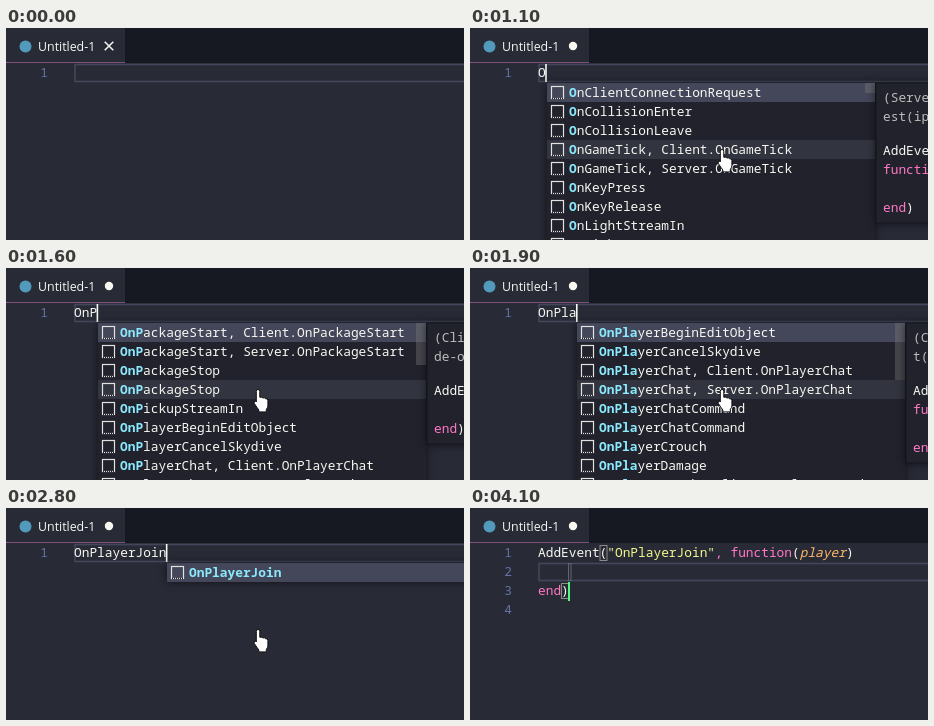
Animation of 458x212 px, one loop 4200 ms. Source, as an HTML page:

```html
<!DOCTYPE html>
<html lang="en">
<head>
<meta charset="utf-8">
<title>Editor autocomplete</title>
<style>
  html, body { margin: 0; width: 100%; height: 100%; overflow: hidden; background: #282a36; }
  svg { display: block; width: 458px; height: 212px; }
  text { font: 500 12.83px "Noto Sans Mono", "DejaVu Sans Mono", monospace; fill: #f8f8f2; white-space: pre; }
  .tab { font: 12.4px "Open Sans", "Noto Sans", sans-serif; }
  .num { fill: #6272a4; font-weight: 400; }
  .pink { fill: #ff79c6; }
  .str { fill: #f1fa8c; }
  .arg { fill: #ffb86c; font-style: italic; }
  .hit { fill: #8be9fd; font-weight: 700; }
  .dim { fill: #bdbdbb; font-weight: 400; }
  .panel { filter: drop-shadow(0 0 4px #0009); }
</style>
</head>
<body>
<svg id="stage" viewBox="0 0 458 212"></svg>
<script>
const LOOP = 4200, LEFT = 68, CHAR = 7.697, ROW = 19;
const WORD = 'OnPlayerJoin';
// Time at which each letter of WORD appears
const KEYS = [800, 1400, 1600, 1700, 1900, 2000, 2100, 2200, 2400, 2500, 2600, 2800];
const ACCEPT = 3000;

const both = name => ['Client', 'Server'].map(side => `${name}, ${side}.${name}`);
const PLAYER = ['OnPlayerBeginEditObject', 'OnPlayerCancelSkydive', ...both('OnPlayerChat'),
  'OnPlayerChatCommand', 'OnPlayerChatCommand', 'OnPlayerCrouch', 'OnPlayerDamage', ...both('OnPlayerDeath')];
const LISTS = [
  { from: 1, thumb: 10, docs: ['(Server) OnClientConnectionRequ', 'est(ip, port)', 'AddEvent', 'function', '', 'end)'],
    items: ['OnClientConnectionRequest', 'OnCollisionEnter', 'OnCollisionLeave', ...both('OnGameTick'),
      'OnKeyPress', 'OnKeyRelease', 'OnLightStreamIn', 'OnLightStreamOut'] },
  { from: 3, thumb: 42, docs: ['(Client)', 'de-on', 'AddEvent', '', 'end)'],
    items: [...both('OnPackageStart'), 'OnPackageStop', 'OnPackageStop', 'OnPickupStreamIn', ...PLAYER] },
  { from: 4, thumb: 57, docs: ['(Client)', 't(object)', 'AddEvent', 'function', '', 'end)'], items: PLAYER },
  { from: 9, thumb: 0, docs: [], items: ['OnPlayerJoin'] }
];

const rect = (x, y, w, h, fill, more = '') =>
  `<rect x="${x}" y="${y}" width="${w}" height="${h}" fill="${fill}" ${more}/>`;
const frame = (x, y, w, h, color, width = 1) =>
  rect(x, y, w, h, 'none', `stroke="${color}" stroke-width="${width}"`);
const text = (x, y, s, cls = '') => `<text x="${x}" y="${y}" class="${cls}">${s}</text>`;
const span = (cls, s) => `<tspan class="${cls}">${s}</tspan>`;
const path = (d, more) => `<path d="${d}" ${more}/>`;
const baseline = line => 30 + ROW * line;

function tab(dirty) {
  const mark = dirty
    ? '<circle cx="103" cy="18" r="4.2" fill="#f8f8f2"/>'
    : path('M98.7 13.7l8.6 8.6m0-8.6l-8.6 8.6', 'stroke="#f8f8f2" stroke-width="1.5"');
  return rect(0, 0, 458, 35, '#171922') + rect(0, 0, 119, 35, '#282a36') + rect(0, 34, 119, 1, '#80507a') +
    '<circle cx="19.5" cy="18.5" r="6" fill="#519aba"/>' + text(32, 22.5, 'Untitled-1', 'tab') + mark;
}

const lineBox = line => frame(69, 17.5 + ROW * line, 400, 17, '#44475a', 1.6);
const lineNumber = line => text(34.3, baseline(line), line, 'num');

function popup(typed, withDocs) {
  const list = LISTS.filter(l => l.from <= typed).pop();
  const x = Math.floor(69.5 + 7.69 * typed), top = 55, width = 328;
  const height = list.items.length * ROW;
  let out = rect(x, top, width, height, '#21222c', 'class="panel"') + rect(x, top, width, ROW, '#44475a');
  if (list.items.length > 3) out += rect(x, top + 3 * ROW, width, ROW, '#323440');
  list.items.forEach((item, i) => {
    const y = top + i * ROW;
    out += rect(x + 4.5, y + 3.5, 12, 12, 'none', 'stroke="#e2e2de" stroke-width="1.2"') +
      path(`M${x + 5} ${y + 15.5}h12`, 'stroke="#21222c" stroke-width="1.6" stroke-dasharray="1 1"') +
      text(x + 22, y + 14, span('hit', item.slice(0, typed)) + item.slice(typed));
  });
  out += rect(x + width - 10, top, 10, list.thumb, '#79797966');
  if (withDocs && list.docs.length) {
    const dx = x + width + 1, last = list.docs.length - 1;
    out += rect(dx, top, 200, 26 + ROW * list.docs.length, '#21222c', 'stroke="#15161d" class="panel"');
    list.docs.forEach((s, i) => {
      const cls = i < 2 ? 'dim' : s === 'function' ? 'pink' : '';
      const body = i === last ? span('pink', 'end') + ')' : s;
      out += text(dx + 7, 73.5 + ROW * i + (i > 1 ? 15 : 0), body, cls);
    });
  }
  return out;
}

function snippet(caretOn) {
  const gray = '#8b8c88';
  return [1, 2, 3, 4].map(lineNumber).join('') + lineBox(2) +
    frame(130, 37.5, 7, 15, gray) + frame(91.5, 75.5, 7, 15, gray) +
    text(LEFT, baseline(1), 'AddEvent(' + span('str', `"${WORD}"`) + span('pink', ', function') + '(' +
      span('arg', 'player') + ')') +
    text(LEFT, baseline(3), span('pink', 'end') + ')') +
    frame(98.5, 55.5, 2.5, 17, '#626575') + rect(98, 74, 2, 19, '#50fa7b') +
    (caretOn ? rect(98.5, 54, 2, 19, '#f8f8f2') : '');
}

const hand = (x, y) => path('M5 .5q1.8 0 1.8 1.8v6q3-.8 3 .7 2.4-.8 2.8.8 2.3-.5 2.3 1.6v5q0 2-1.6 4v2.5h-7.5v-2' +
  'q-1.6-2-4.5-6.5-.8-2.2 1-2.4l1 1v-10.7q0-1.8 1.7-1.8z', `transform="translate(${x} ${y})" fill="#fff" stroke="#111"`);
const beam = (x, y) => path('M-3.5-7.5h2.5l1 1 1-1h2.5M0-7v14M-3.5 7.5h2.5l1-1 1 1h2.5',
  `transform="translate(${x} ${y})" fill="none" stroke="#08090c" stroke-width="1.2"`);

function pointer(t, open) {
  if (t < 100 || t >= 3600) return '';
  if (open) return hand(247, 121);
  if (t < 600) {
    const left = ((600 - t) / 500) ** 2;
    return beam(254.5 + 188 * left, 131 + 73 * left);
  }
  return beam(254.5, 131 + Math.max(0, t - 3300) * 0.26);
}

function draw(t) {
  const typed = KEYS.filter(k => k <= t).length;
  const done = t >= ACCEPT, open = t >= 900 && !done;
  let out = tab(typed > 0);
  if (done) {
    out += snippet(t < 3400 || (t >= 3800 && t < 4100));
  } else {
    const caretOn = typed || (t >= 200 && t < 600);
    out += lineNumber(1) + lineBox(1) + text(LEFT, baseline(1), WORD.slice(0, typed)) +
      (caretOn ? rect(LEFT - 0.5 + CHAR * typed, 36, 1.6, 18, '#f8f8f2') : '');
    if (open) out += popup(typed, t >= 1000);
  }
  return out + pointer(t, open);
}

const stage = document.getElementById('stage');
let shown = -1;
function tick() {
  const t = Math.floor(performance.now() % LOOP / 100) * 100;
  if (t !== shown) stage.innerHTML = draw(shown = t);
  requestAnimationFrame(tick);
}
tick();
</script>
</body>
</html>
```
